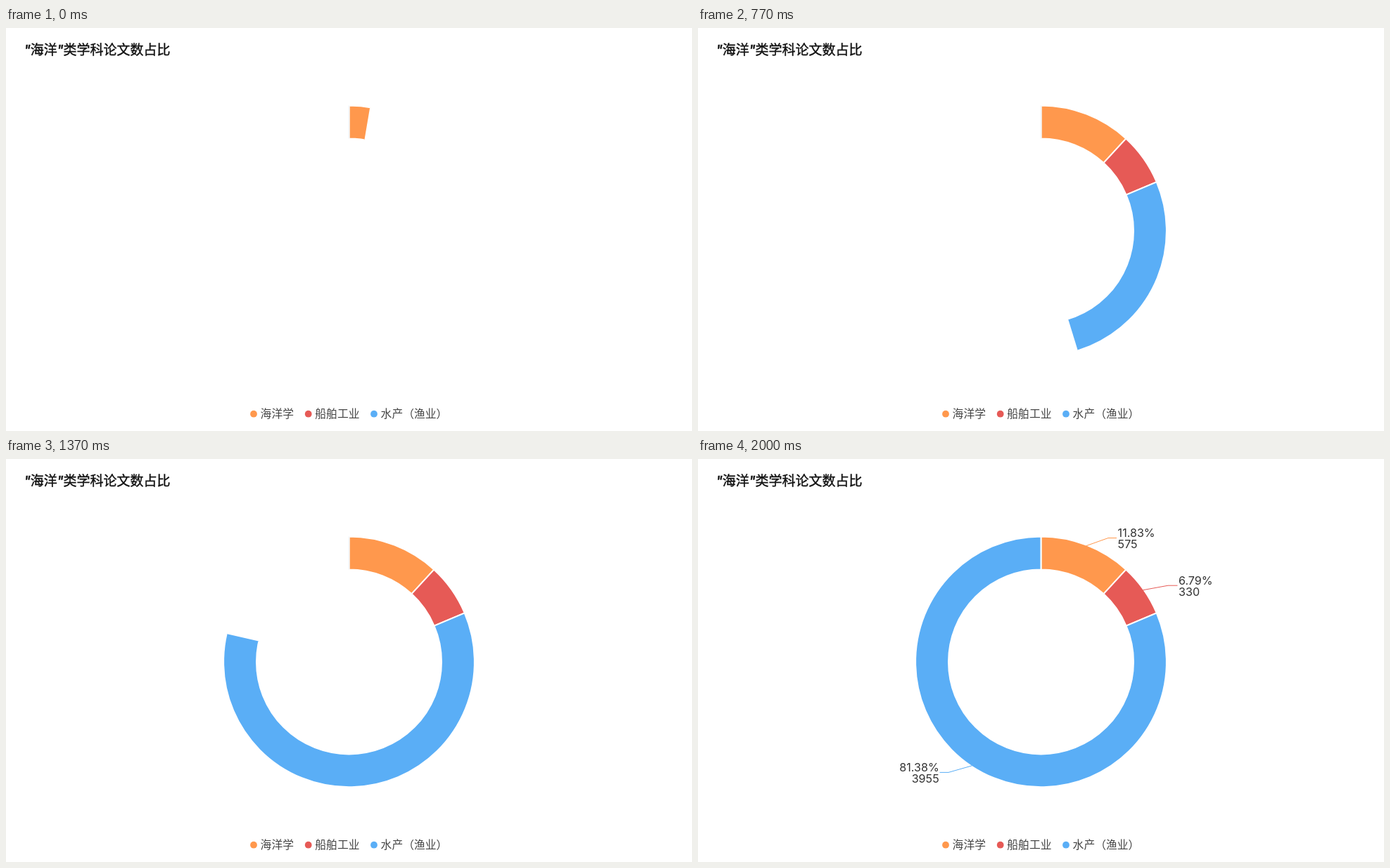
Animation, 975 px wide and 574 px high, one loop 3.01 s. Source, as an HTML page with a canvas:

```html
<!DOCTYPE html>
<html lang="zh-CN">
<head>
<meta charset="utf-8">
<style>
html, body { margin: 0; width: 100%; height: 100%; overflow: hidden; background: #fff; }
canvas { display: block; }
</style>
</head>
<body>
<canvas id="chart" width="975" height="574"></canvas>
<script>
const ctx = document.getElementById('chart').getContext('2d');
const CJK = '"Noto Sans CJK SC", "Noto Sans CJK", sans-serif';
const LATIN = 'Inter, sans-serif';
const LOOP = 3010;
const CX = 487.5, CY = 288.9, OUTER = 178.4, INNER = 131.5, BORDER = 2;
const TOP = -Math.PI / 2;
const rad = degrees => degrees * Math.PI / 180;

const series = [
  { name: '海洋学', value: 575, color: '#ff984d', dotX: 352, elbow: [583, 112.5], end: 595, textX: 596.6 },
  { name: '船舶工业', value: 330, color: '#e65a56', dotX: 429.7, elbow: [668, 180.2], end: 681.5, textX: 683 },
  { name: '水产（渔业）', value: 3955, color: '#5aaef6', dotX: 523, elbow: [356, 446.4], end: 343.5, textX: 342.7, align: 'right' },
];
const total = series.reduce((sum, s) => sum + s.value, 0);
let angle = TOP;
for (const s of series) {
  s.start = angle;
  s.stop = angle += s.value / total * 2 * Math.PI;
}

function text(string, x, y, font, color, align = 'left') {
  ctx.font = font;
  ctx.fillStyle = color;
  ctx.textAlign = align;
  ctx.fillText(string, x, y);
}

// Text thickened by a hairline outline, for a medium weight
function mediumText(string, x, y, font, color) {
  text(string, x, y, font, color);
  ctx.strokeStyle = color;
  ctx.lineWidth = 0.4;
  ctx.strokeText(string, x, y);
}

function drawTitle() {
  const font = '500 19px ' + CJK, quote = 'italic 500 19px ' + LATIN;
  mediumText('"', 25.5, 37.5, quote, '#111');
  mediumText('海洋', 34.7, 38, font, '#111');
  mediumText('"', 72.3, 37.5, quote, '#111');
  mediumText('类学科论文数占比', 81.5, 38, font, '#111');
}

function drawLegend() {
  for (const s of series) {
    ctx.beginPath();
    ctx.arc(s.dotX, 549.7, 4.9, 0, 2 * Math.PI);
    ctx.fillStyle = s.color;
    ctx.fill();
    text(s.name, s.dotX + 9.6, 555.4, '15.8px ' + CJK, '#444');
  }
}

function drawRing(sweep) {
  ctx.save();
  if (sweep < 360) {
    ctx.beginPath();
    ctx.moveTo(CX, CY);
    ctx.arc(CX, CY, 200, TOP, TOP + rad(sweep));
    ctx.clip();
  }
  ctx.strokeStyle = '#fff';
  ctx.lineWidth = BORDER;
  for (const s of series) {
    ctx.beginPath();
    ctx.arc(CX, CY, OUTER, s.start, s.stop);
    ctx.arc(CX, CY, INNER, s.stop, s.start, true);
    ctx.closePath();
    ctx.fillStyle = s.color;
    ctx.fill();
    ctx.stroke();
  }
  ctx.restore();
}

function drawLabels(alpha) {
  const edge = OUTER - BORDER / 2, font = '16.1px ' + LATIN;
  ctx.save();
  ctx.globalAlpha = alpha;
  ctx.lineWidth = 1;
  for (const s of series) {
    const middle = (s.start + s.stop) / 2, [x, y] = s.elbow;
    ctx.beginPath();
    ctx.moveTo(CX + edge * Math.cos(middle), CY + edge * Math.sin(middle));
    ctx.lineTo(x, y);
    ctx.lineTo(s.end, y);
    ctx.strokeStyle = s.color;
    ctx.stroke();
    const percent = (s.value / total * 100).toFixed(2) + '%';
    text(percent, s.textX, y - 1.2, font, '#333', s.align);
    text(s.value, s.textX, y + 14.8, font, '#333', s.align);
  }
  ctx.restore();
}

function draw(ms) {
  // 30 steps per second, with step times rounded to 10 ms
  const step = Math.floor((3 * Math.floor(ms / 10) + 1) / 10);
  const alpha = Math.min(1, Math.max(0, (step - 55) / 5));
  ctx.fillStyle = '#fff';
  ctx.fillRect(0, 0, 975, 574);
  drawTitle();
  drawLegend();
  drawRing(9.6 + step * 20 / 3);
  if (alpha > 0) drawLabels(alpha);
}

const began = performance.now();
function tick() {
  draw((performance.now() - began) % LOOP);
  requestAnimationFrame(tick);
}
tick();
</script>
</body>
</html>
```
